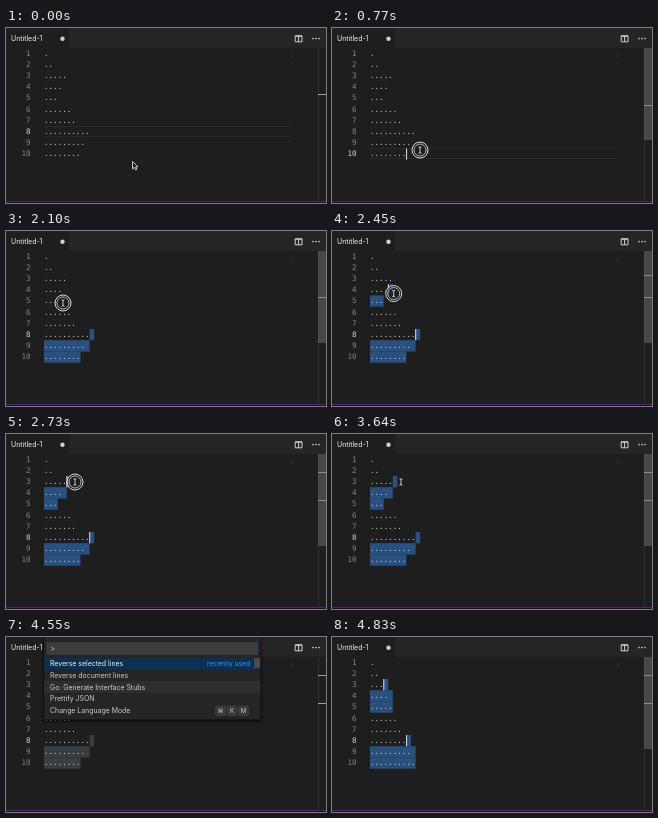
An HTML page for the animation above (5.25 s loop, 320x175 px).

```html
<!DOCTYPE html>
<html>
<head>
<meta charset="utf-8">
<style>
  html, body { margin: 0; height: 100%; overflow: hidden; background: #1e1e1e; }
  svg { display: block; width: 100vw; height: 100vh; }
  .code { font: 7.57px "DejaVu Sans Mono", "Noto Sans Mono", monospace; }
  .ui { font: 6.93px Inter, "DejaVu Sans", sans-serif; }
</style>
</head>
<body>
<svg id="stage" viewBox="0 0 320 175"></svg>
<script>
const LOOP = 5250, STEP = 70;
const LEFT = 38, CHAR = 4.56, TOP = 19.6, ROW = 11.2;
const BEFORE = [1, 2, 5, 4, 3, 6, 7, 10, 9, 8];
const AFTER = [1, 2, 3, 4, 5, 6, 7, 8, 9, 10];
const COMMANDS = ['Reverse selected lines', 'Reverse document lines',
  'Go: Generate Interface Stubs', 'Prettify JSON', 'Change Language Mode'];

const stage = document.getElementById('stage');
const colX = c => LEFT + c * CHAR;
const rowY = n => TOP + (n - 1) * ROW;
const clamp = v => Math.max(0, Math.min(1, v));
const ramp = (t, a, b) => clamp((t - a) / (b - a));
const mix = (a, b, p) => a + (b - a) * p;
const within = (t, a, b) => t >= a && t < b;

const rect = (x, y, w, h, fill, more = '') =>
  `<rect x="${x}" y="${y}" width="${w}" height="${h}" fill="${fill}" ${more}/>`;
const text = (x, y, s, fill, cls = 'ui', more = '') =>
  `<text x="${x}" y="${y}" fill="${fill}" class="${cls}" ${more}>${s}</text>`;
const path = (d, more) => `<path d="${d}" ${more}/>`;

// Each move: start, end, starting point; it ends where the next one starts.
const MOVES = [[70, 280, 127, 137], [840, 1120, 88, 122], [1540, 1960, 92, 104],
  [2310, 2730, 57, 72], [LOOP, LOOP, 69, 48]];

function pointerAt(t) {
  let [, , x, y] = MOVES[0];
  for (let i = 0; i < MOVES.length - 1; i++) {
    const [a, b, x0, y0] = MOVES[i], [, , x1, y1] = MOVES[i + 1];
    if (t < a) break;
    const p = ramp(t, a - STEP, b), e = p * p * (3 - 2 * p);
    x = mix(x0, x1, e);
    y = mix(y0, y1, e);
  }
  return [x, y];
}

// A backward selection from the end of the last row to the end of the first.
function selection(first, last, lens, fill) {
  let out = '';
  for (let n = first; first < last && n <= last; n++) {
    const a = n === first ? lens[n - 1] : 0;
    const b = lens[n - 1] + (n < last ? 1 : 0);
    out += rect(colX(a), rowY(n), (b - a) * CHAR, ROW + .1, fill);
  }
  return out;
}

function frame() {
  return rect(0, 0, 320, 175, '#1e1e1e') +
    rect(63, 0, 257, 20, '#252526') +
    text(5, 13.2, 'Untitled-1', '#f0f0f0') +
    '<circle cx="56.5" cy="10.7" r="2.2" fill="#d0d0d0"/>' +
    path('M289.2 7.8h6.8v6h-6.8zM292.6 7.8v6M289.2 8.2h6.8', 'fill="none" stroke="#d0d0d0"') +
    [307, 310, 313].map(x => `<circle cx="${x}" cy="10.5" r=".85" fill="#d0d0d0"/>`).join('') +
    rect(312, 20, .6, 153, '#3a3a3a') +
    rect(0, 173, 320, 1, '#54206a') +
    rect(0, 174, 320, 1, '#1c0c22');
}

function editor(t, top1, top2, rows) {
  const done = t >= 4690, lens = done ? AFTER : BEFORE;
  const fill = within(t, 3780, 4620) ? '#3a3d41' : '#2a5080';
  let out = '';

  if (t < 840) {
    const y = Math.round(rowY(rows[0]));
    out += rect(LEFT, y, 247, 1, '#292929') + rect(LEFT, y + 10, 247, 1, '#292929');
  } else {
    out += selection(top1, 10, lens, fill);
  }
  if (top2) out += selection(top2, 5, lens, fill);

  lens.forEach((len, i) => {
    const n = i + 1, base = Math.round(rowY(n) + 8);
    out += text(24.5, base, n, n === rows[0] ? '#d2d2d2' : '#858585', 'code', 'text-anchor="end"');
    out += text(LEFT, base, '.'.repeat(len), '#d4d4d4', 'code');
    out += rect(285, 24 + i * .6, len * .3, .4, '#343434');
  });

  const caret = n => rect(colX(lens[n - 1]) - .4, rowY(n), 1, ROW, '#e4e4e4');
  if (within(t, 490, 1610) || within(t, 2170, 3360) || done) out += caret(top1);
  if (within(t, 2170, 3220) || done) out += caret(top2);

  const slider = t < 4200 ? ramp(t, 350, 630) : ramp(t, 4620, 4830);
  rows.forEach(n => out += rect(312, Math.round(66 + (n - 8) * 5.6), 8, 1, '#a0a0a0'));
  out += rect(312, 20, 8, 92, '#797979', `opacity="${slider * .45}"`);
  return out;
}

function palette(t) {
  let out = rect(36.5, 0, 220, 86, '#000', 'opacity=".3"') +
    rect(37.5, 0, 217.5, 84, '#000', 'opacity=".4"') +
    rect(38, 0, 216.5, 82.5, '#252526') +
    rect(41, 5.5, 210.5, 12, '#3c3c3c', 'stroke="#2c4a63" stroke-width=".6"') +
    text(44.5, 14, '&gt;', '#cccccc') +
    rect(38, 21, 216.5, 11.6, '#0a3154');
  if (t < 4340) out += rect(49.5, 7.5, .7, 8, '#d0d0d0');
  if (t >= 3990) out += rect(38, 44.3, 216.5, 11.6, '#2d2e30');
  COMMANDS.forEach((s, i) => out += text(44, 29.4 + i * 11.6, s, i ? '#cccccc' : '#f0f0f0'));
  out += text(244, 29.4, 'recently used', '#3794ff', 'ui', 'text-anchor="end" style="font-size:6.7px"') +
    rect(248, 21, 6, 10, '#4b4b4c');
  ['⌘', 'K', 'M'].forEach((key, i) => {
    const x = 209.5 + i * 11.5;
    out += rect(x, 69, 10, 9.5, '#39393a', 'rx="1.5" stroke="#4a4a4b" stroke-width=".5"') +
      text(x + 5, 76, key, '#cccccc', 'ui', 'text-anchor="middle" style="font-size:6px"');
  });
  return out;
}

function pointer(t, [x, y]) {
  const at = `transform="translate(${x} ${y})"`;
  if (t < 140) {
    return path('M-.5 -3.5v7.4l1.8-1.6 1.3 2.7 1.2-.6-1.2-2.5h2.3z',
      `${at} fill="#111" stroke="#f4f4f4" stroke-width=".8"`);
  }
  let out = '';
  if (within(t, 420, 1260) || within(t, 2100, 2870)) {
    out += `<circle r="8" fill="#1e1e1e" fill-opacity=".75" stroke="#eee" stroke-width=".9"/>
      <circle r="6" fill="none" stroke="#ddd" stroke-width=".8"/>`;
  }
  out += path('M-1.5-3.3Q0-3.3 0-2.2Q0-3.3 1.5-3.3M0-2.5V2.5M-1.5 3.3Q0 3.3 0 2.2Q0 3.3 1.5 3.3',
    'fill="none" stroke="#eee" stroke-width=".8"');
  return `<g ${at}>${out}</g>`;
}

function draw(t) {
  const pos = pointerAt(t);
  const hit = Math.floor((pos[1] - TOP) / ROW) + 1;
  const top1 = t < 490 ? 8 : t < 840 ? 10 : t < 1190 ? Math.max(8, Math.min(10, hit)) : 8;
  const top2 = t < 2170 ? 0 : Math.max(3, Math.min(5, hit));
  const rows = top2 ? [top1, top2] : [top1];
  stage.innerHTML = frame() + editor(t, top1, top2, rows) +
    (within(t, 3780, 4620) ? palette(t) : '') +
    (t < 3780 ? pointer(t, pos) : '');
}

let last = -1;
const start = performance.now();
function tick(now) {
  const t = Math.floor((Math.max(0, now - start) % LOOP) / STEP) * STEP;
  if (t !== last) draw(last = t);
  requestAnimationFrame(tick);
}
tick(start);
</script>
</body>
</html>
```
